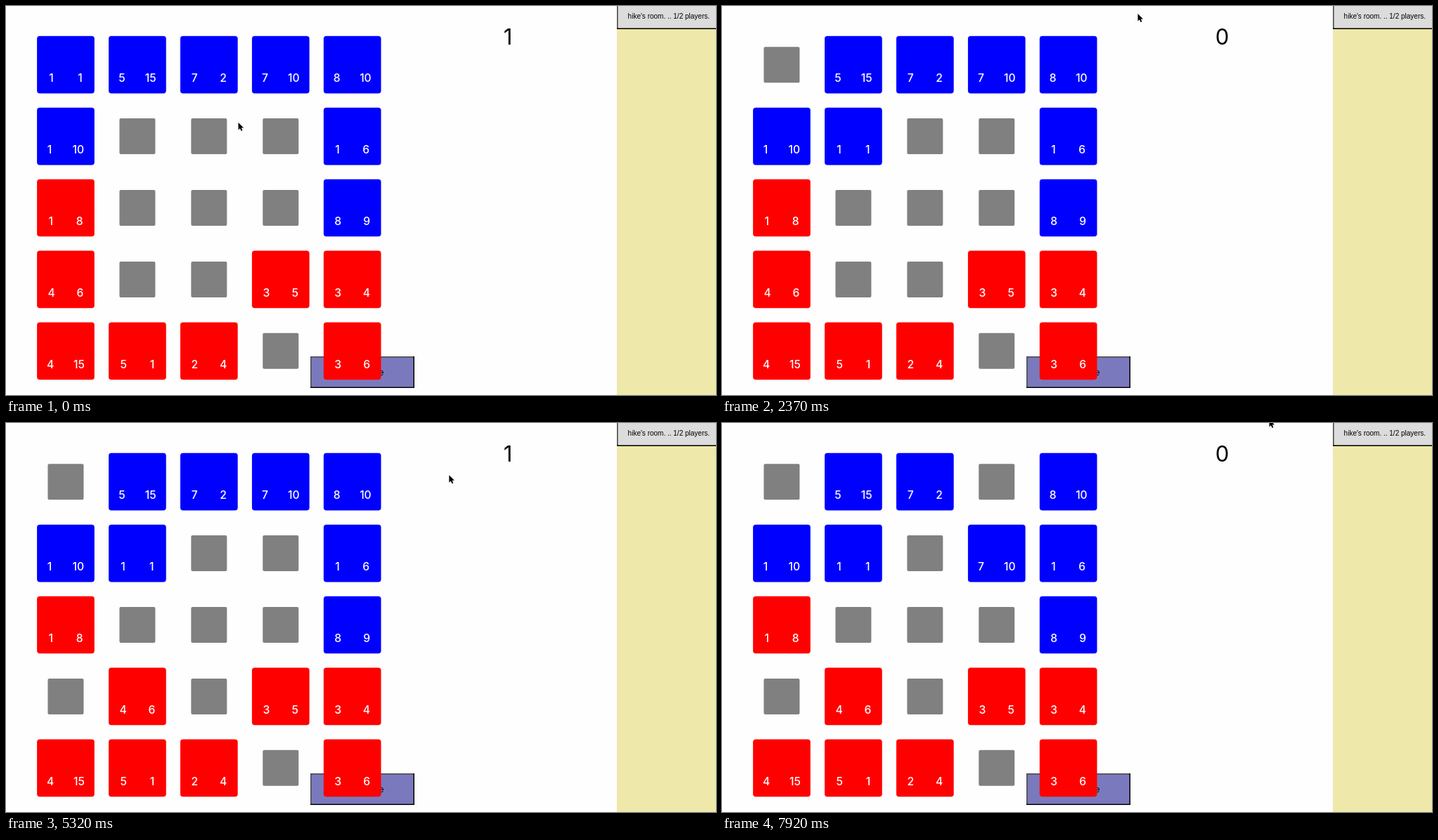
An HTML page with a canvas for the animation above (8000 ms loop, 1010 by 554 pixels).

```html
<!DOCTYPE html>
<html lang="en">
<head>
<meta charset="utf-8">
<title>Board game</title>
<style>
html, body { margin: 0; width: 100%; height: 100%; overflow: hidden; background: #fefefe; }
canvas { display: block; }
</style>
</head>
<body>
<canvas id="stage" width="1010" height="554"></canvas>
<script>
const ctx = document.getElementById('stage').getContext('2d');
const LOOP = 8000, STEP = 118.2, LEAD = 8.5;
const PITCH = 101.93, TILE = 81.7, SLOT = 51;
const ARIAL = '"Liberation Sans", Arial, sans-serif';

// Row by row: b = blue, r = red, empty = free slot
const START = `b1 1,b5 15,b7 2,b7 10,b8 10
b1 10,,,,b1 6
r1 8,,,,b8 9
r4 6,,,r3 5,r3 4
r4 15,r5 1,r2 4,,r3 6`.split(/[,\n]/);

const TURNS = [
  { pick: 8, move: 16, from: 0, to: 6 },
  { pick: 30, move: 33, from: 15, to: 16 },
  { pick: 52, move: 63, from: 3, to: 8 }
];

// Pointer glides: first step, number of steps, end x, end y, downward bow
const GLIDES = [
  [0, 7, 87, 94, 50],
  [8, 3, 166, 157],
  [13, 2, 183, 181],
  [18, 2, 591, 10],
  [23, 3, 257, 314],
  [27, 2, 106, 374],
  [30, 3, 191, 386],
  [34, 6, 771, 6],
  [44, 6, 309, 165, 22],
  [50, 1, 372, 96],
  [52, 4, 302, 181],
  [59, 3, 388, 182],
  [63, 3, 658, 88],
  [66, 1, 778, -6]
];

function rect(x, y, w, h, color) {
  ctx.fillStyle = color;
  ctx.fillRect(x, y, w, h);
}

function square(x, y, size, radius, color) {
  ctx.fillStyle = color;
  ctx.beginPath();
  ctx.roundRect(x, y, size, size, radius);
  ctx.fill();
}

function text(str, x, y, font, color = '#000') {
  ctx.font = font;
  ctx.fillStyle = color;
  ctx.fillText(str, x, y);
}

// Outset button: grey upper left edges, black lower right edges
function button(x, y, w, h, color) {
  const edge = 1.6;
  rect(x, y, w, h, '#000');
  rect(x, y, w - edge, h - edge, '#4c4c4c');
  rect(x + edge, y + edge, w - 2 * edge, h - 2 * edge, color);
}

function drawCell(cell, i, selected) {
  const x = 44.1 + (i % 5) * PITCH, y = 42.8 + Math.floor(i / 5) * PITCH;
  if (!cell) {
    const inset = (TILE - SLOT) / 2;
    square(x + inset, y + inset, SLOT, 2, '#808080');
    return;
  }
  if (selected) square(x - 2, y - 2, TILE + 4, 5, '#800080');
  square(x, y, TILE, 4, cell[0] === 'b' ? '#00f' : '#f00');

  // Two numbers with equal space around each
  const font = '500 15.6px Inter, sans-serif';
  ctx.font = font;
  const [a, b] = cell.slice(1).split(' ');
  const wa = ctx.measureText(a).width, wb = ctx.measureText(b).width;
  const gap = (TILE - wa - wb) / 4;
  text(a, x + gap, y + 65.2, font, '#fff');
  text(b, x + gap * 3 + wa, y + 65.2, font, '#fff');
}

function drawScore(n) {
  const font = '31px Inter, sans-serif';
  ctx.font = font;
  const m = ctx.measureText(n);
  const mid = (m.actualBoundingBoxRight - m.actualBoundingBoxLeft) / 2;
  text(n, 711.3 + 2 * n - mid, 55, font);
}

function drawSidebar(open) {
  rect(869, 0, 141, 554, '#eee8aa');
  if (!open) return;
  button(869, -2, 145, 35, '#dcdcdc');
  text("hike's room. .. 1/2 players.", 884.6, 18, '10px ' + ARIAL);
}

function pointerAt(step) {
  let x = 330, y = 165;
  for (const [first, count, toX, toY, bow = 0] of GLIDES) {
    if (step <= first) break;
    const u = Math.min(1, (step - first) / count);
    const e = u * (2 - u);
    x += (toX - x) * e;
    y += (toY - y) * e + 4 * bow * e * (1 - e);
  }
  return [x, y];
}

function drawPointer(step) {
  const [x, y] = pointerAt(step);
  const arrow = new Path2D('M0 0V10.4L2.4 8.2L4.1 12L5.9 11.2L4.3 7.5H7.5Z');
  ctx.save();
  ctx.translate(x + 0.5, y + 1);
  ctx.strokeStyle = '#fff';
  ctx.lineWidth = 1.6;
  ctx.stroke(arrow);
  ctx.fillStyle = '#000';
  ctx.fill(arrow);
  ctx.restore();
}

function draw(time) {
  const step = Math.floor((time % LOOP + LEAD) / STEP);
  const board = START.slice();
  let selected = -1, score = 1;
  for (const { pick, move, from, to } of TURNS) {
    if (step >= move) {
      board[to] = board[from];
      board[from] = '';
      score = 1 - score;
    } else if (step >= pick) {
      selected = from;
    }
  }
  rect(0, 0, 1010, 554, '#fefefe');
  button(433, 499, 148, 45, '#7b79be');
  text('e', 530, 526, '13.6px ' + ARIAL);
  board.forEach((cell, i) => drawCell(cell, i, i === selected));
  drawScore(score);
  drawSidebar(step < 24 || step >= 45);
  drawPointer(step);
}

const start = performance.now();
function frame() {
  draw(performance.now() - start);
  requestAnimationFrame(frame);
}
frame();
</script>
</body>
</html>
```
